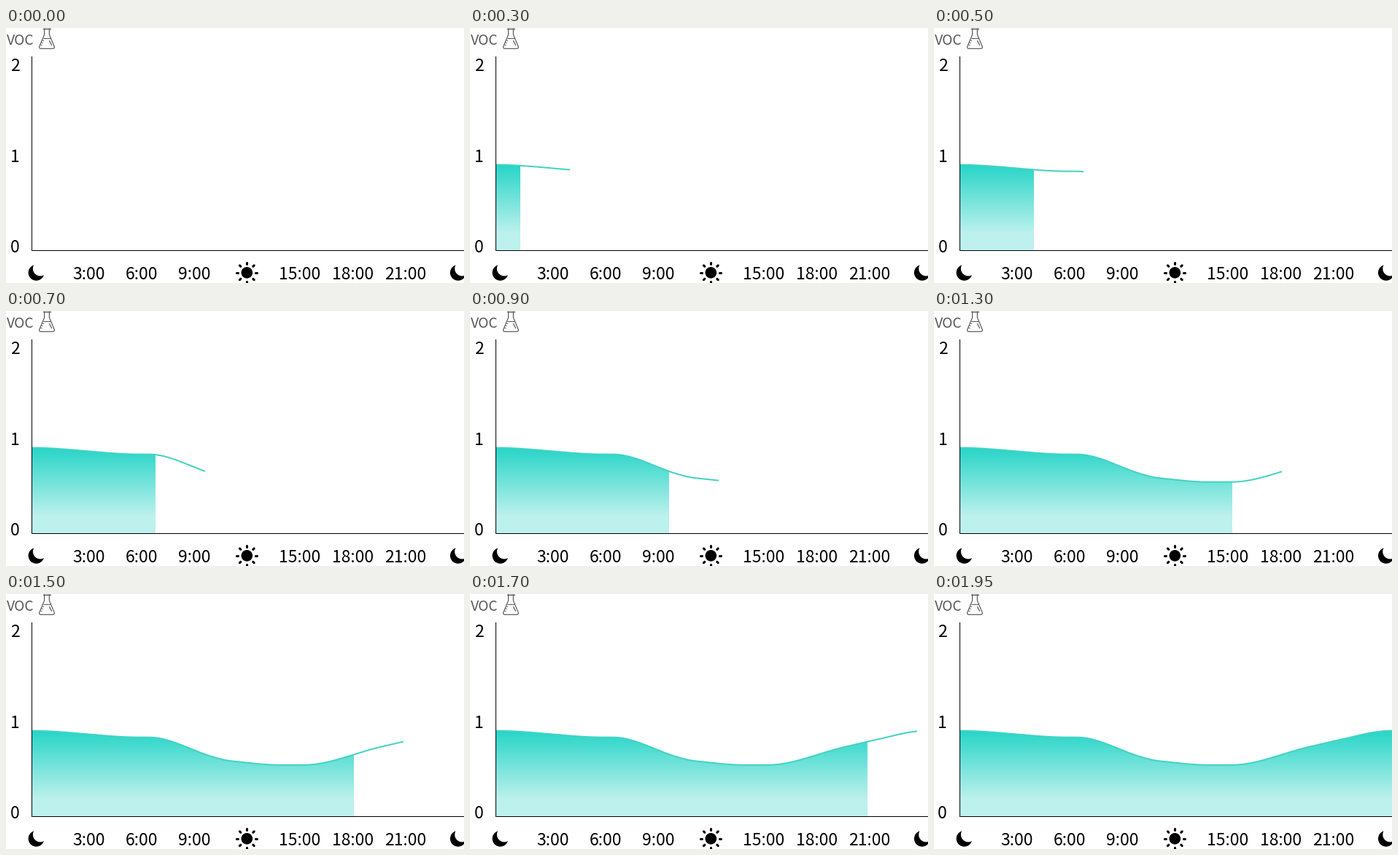
Recreate the animation shown at these times as a matplotlib script. Size 628 by 350 pixels, loop 2400 ms.

```python
import numpy as np
import matplotlib.pyplot as plt
from matplotlib.animation import FuncAnimation
from matplotlib.colors import LinearSegmentedColormap
from matplotlib.patches import Circle, Polygon, Rectangle

W, H, DPI = 628, 350, 100
FRAMES, INTERVAL = 48, 50
LEFT, BASE, START = 35, 305, 187.7
END = 630
SPEED, LAG = 17, 4          # px per frame, frames the fill trails the line
PX = 72 / DPI
FONT = "Noto Sans CJK JP"
GRAY = "#595959"

# eased steps of the curve: from x, to x, change in y
STEPS = [(35, 185, 9), (196, 310, 31), (280, 375, 7),
         (408, 547, -29), (516, 626, -18)]


def smooth(x, a, b):
    t = np.clip((x - a) / (b - a), 0, 1)
    return t * t * (3 - 2 * t)


def curve(x):
    return START + sum(dy * smooth(x, a, b) for a, b, dy in STEPS)


def trace(right):
    xs = np.linspace(LEFT, right, int(right - LEFT) + 1)
    return xs, curve(xs)


fig = plt.figure(figsize=(W / DPI, H / DPI), dpi=DPI, facecolor="white")
ax = fig.add_axes([0, 0, 1, 1])
ax.axis("off")


def stroke(xs, ys, width, color="black", cap="butt", z=4):
    return ax.plot(xs, ys, color=color, lw=width * PX, solid_capstyle=cap,
                   solid_joinstyle="round", zorder=z)[0]


def label(x, y, text, size=23, color="black", ha="center"):
    return ax.text(x, y, text, fontsize=size * PX, family=FONT, color=color,
                   ha=ha, va="baseline", zorder=5)


def disc(x, y, r, color="black"):
    ax.add_patch(Circle((x, y), r, fc=color, lw=0, zorder=4))


def bar(x, y, w, h):
    ax.add_patch(Rectangle((x, y), w, h, fc="black", lw=0,
                           antialiased=False, zorder=4))


def moon(x, y):
    disc(x, y, 10.9)
    disc(x + 5.5, y - 5.5, 10.1, "white")


def sun(x, y):
    disc(x, y, 7.8)
    r = np.array([12, 14])
    for a in np.arange(8) * np.pi / 4:
        stroke(x + r * np.cos(a), y + r * np.sin(a), 3.1, cap="round")


def flask(x):
    stroke([x - 5, x + 5], [0.5, 0.5], 1.4, GRAY, "round")
    half = np.array([(3.4, 0.5), (3.4, 9), (4.4, 11.5), (10.3, 25.5),
                     (10.3, 27.2), (8.7, 28.3)])
    xs, ys = np.vstack([half, half[::-1] * [-1, 1]]).T
    stroke(x + xs, ys, 1.2, GRAY)
    stroke([x - 5.4, x + 5.4], [14, 14], 1.1, GRAY)
    stroke([x + 3.5, x + 6.6], [17.5, 23.5], 1.2, GRAY, "round")
    for i in range(3):
        tick = x - 6.4 - 1.2 * i
        stroke([tick, tick + 2.4], [17 + 3 * i, 17.6 + 3 * i], 1, GRAY)


cmap = LinearSegmentedColormap.from_list(
    "teal", [(0, "#25d5c7"), (0.8, "#bcf1ed"), (1, "#bcf1ed")])
shade = ax.imshow(np.linspace(0, 1, 256)[:, None], cmap=cmap, aspect="auto",
                  extent=(LEFT, END, BASE, START - 1.5),
                  interpolation="bilinear", zorder=1)
ax.set_xlim(0, W)
ax.set_ylim(H, 0)

area = Polygon([(0, 0)] * 3, fc="none", ec="none")
ax.add_patch(area)
line = stroke([], [], 2, "#42d3c3", z=2)

bar(LEFT, 39, 1, BASE - 38)
bar(LEFT, BASE, W - LEFT, 1)

label(1, 23, "VOC", 19.3, GRAY, "left")
flask(56)

for hour in range(0, 25, 3):
    x = 41.5 + 24.1 * hour
    if hour % 24 == 0:
        moon(x, 335.8)
    elif hour == 12:
        sun(x - 0.4, 335.8)
    else:
        label(x, 345, f"{hour}:00")

levels = [label(12, 308 - 124.5 * v, str(v)) for v in range(3)]


def update(i):
    tip = min(LEFT + SPEED * i, END)
    edge = min(LEFT + SPEED * max(i - LAG, 0), END)

    line.set_data(*trace(tip))
    area.set_xy(np.vstack([(LEFT, BASE), np.column_stack(trace(edge)),
                           (edge, BASE)]))
    shade.set_clip_path(area)
    shade.set_visible(edge > LEFT)

    # the scale nudges left once the chart is complete
    for text in levels:
        text.set_x(12 - (edge >= END))
    return line, shade


anim = FuncAnimation(fig, update, frames=FRAMES, interval=INTERVAL,
                     repeat=True, repeat_delay=0, blit=False)
plt.show()
```
